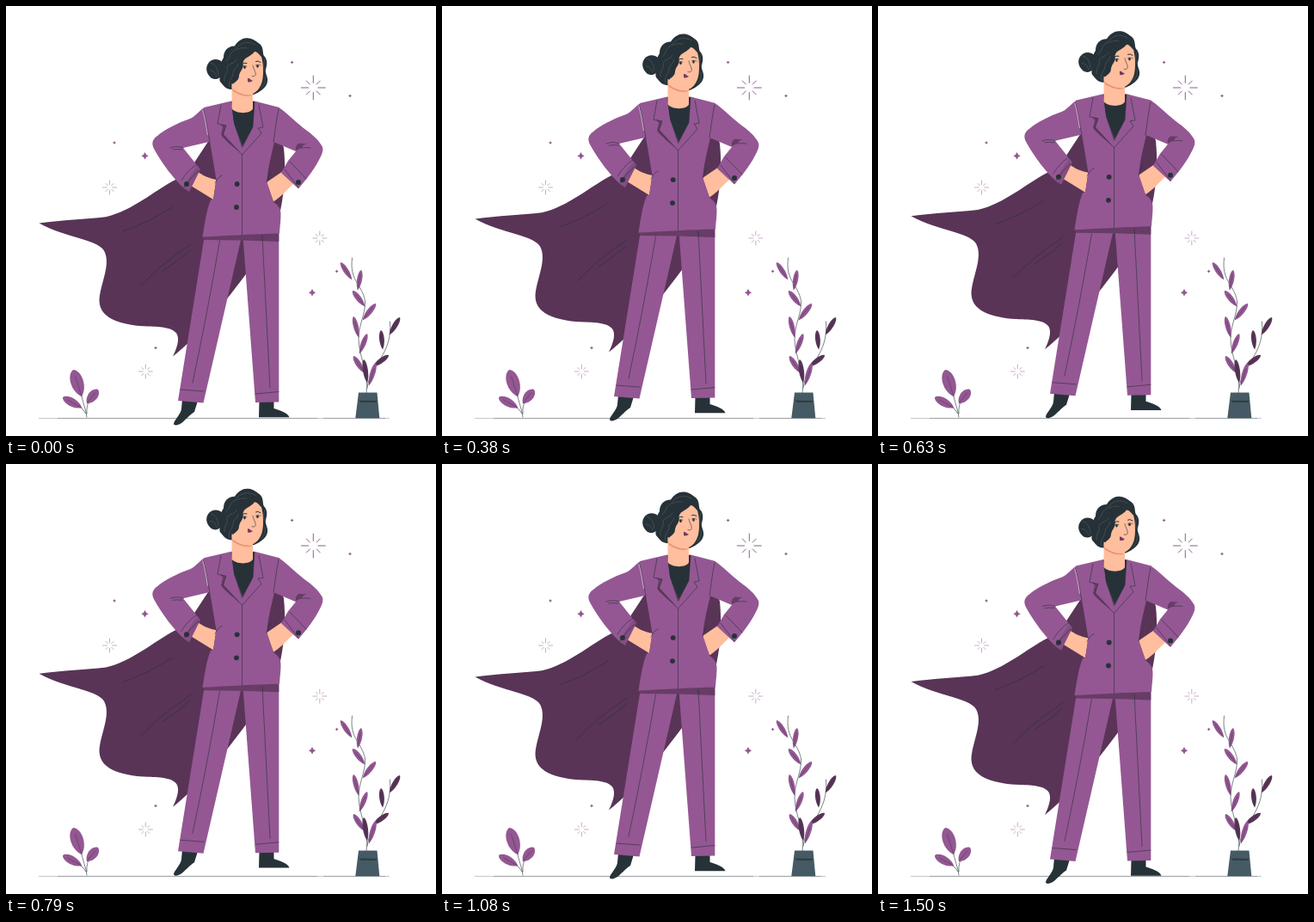
An HTML page that plays this animation: 500x500 px, repeating every 1540 ms.

```html
<!DOCTYPE html>
<html lang="en">
<head>
<meta charset="utf-8">
<title>Caped hero</title>
<style>
  html, body { margin: 0; width: 100%; height: 100%; overflow: hidden; background: #fff; }
  svg { display: block; width: 100vw; height: 100vh; }
  .p { fill: #945793; }
  .d { fill: #593457; }
  .s { fill: #673c66; }
  .k { fill: #263238; }
  .skin { fill: #ffbe9d; }
  .l { fill: none; stroke: #263238; stroke-width: .6; stroke-linecap: round; stroke-linejoin: round; }
  .h { fill: none; stroke: #5b666c; stroke-width: .5; stroke-linecap: round; }
</style>
</head>
<body>
<svg viewBox="0 0 500 500">
  <g id="scene">
    <path d="M60 479.4H362M369 479.4H441" fill="none" stroke="#4d575c" stroke-width=".6"/>
    <path d="M38 479.4H60M362 479.4H369M441 479.4H446" fill="none" stroke="#9aa1a4" stroke-width=".6"/>
  </g>

  <g id="hero">
    <!-- cape -->
    <path class="d" d="M38.5 252.5C66 249 92 248 116 245.300C147 238 172 215 197 202L219 182L240 150H318L323 165C325 185 325 210 319 238L281 309C255 344 222 386 194 407.500C198 399 202 389 199 382C195 374 181 373 165 372.500C140 371.500 109 366 108.500 343C109 325 121 304 115.500 288C112 271 68 270 38.500 252.500Z"/>
    <path class="l" d="M136 262Q168 251 193 234M157 325Q180 300 215 277M182 308Q200 297 214 284"/>

    <!-- shoes -->
    <path class="k" d="M205 457L223 459L219 472C213 476 208 482 204 485C200 487.500 196 488.500 195 486C195 482 204 474 204 468Z"/>
    <path class="k" d="M294.500 459H311.500V468C318 470 328 473 329.500 478.300H294Z"/>

    <!-- trousers -->
    <path class="p" d="M231 266L200 459L229.500 461.500L274 268Z"/>
    <path class="p" d="M275.500 268L290 461L317.300 460.500V264H276Z"/>
    <path class="s" d="M229 267L317.300 262V274L276 272.500L230 272Z"/>
    <path class="l" d="M248.500 273Q234 358 217 438M298 267L307 444M203 446L230 448M290 451L317 448.500"/>

    <!-- hands -->
    <path class="skin" d="M221 191.500C230 198 236 200 244.500 202L241 225L215 209Z"/>
    <path class="skin" d="M322 192L334 207C327 213 320 222 311 227.500L303 205Z"/>

    <!-- arms -->
    <path class="p" d="M231 118C226 120 221 128 214 131C200 136 185 143 176 151C170 155 169 160 172 166C182 184 195 201 207 212L213 216L226 190L206 165L238 157.500Z"/>
    <path class="p" d="M317 118C324 122 336 134 346 142C356 149 364 156 368 164C369 167 368 171 366 175C360 188 350 201 340 212.500L320 194L328 180L337 169L311 158Z"/>
    <path class="s" d="M337 168C336 162 340 158 344 160L350 160C345 161 345 164 343 165Z"/>
    <path class="s" d="M206 210L222 186L226 190L213 216Z" opacity=".35"/>
    <path class="l" d="M191 165Q199 162 206 165M194 167Q200 166 205 167M204 203Q211 191 222 184M349 201Q340 191 330 181M343 165Q349 164 354 165M207 211Q214 200 224 191M340 211L324 190"/>
    <circle class="k" cx="210" cy="207" r="3"/>
    <circle class="k" cx="340" cy="205" r="3"/>

    <!-- jacket -->
    <path class="p" d="M230 118L262 110.500H289L318 118L312 158C308 176 304 190 303.500 205L311 228C316 231 319 235 319.500 241C319.700 249 318.500 256 318 264.500C288 265 260 267 228.500 268.500C231 253 233 238 238 225.500L241 225L244.500 202C242 187 240 174 237 158Z"/>
    <path class="k" d="M262 111L265 136L275 163L287 141L289 111Z"/>
    <path class="s" d="M249 137L256 139L253 149L272 170C263 163 254 156 250 150L252 141Z"/>
    <path class="l" d="M262 112L266 138L274.500 164M250 115L246 137L256 139L252 150L274.500 173L297 148L293 142L299 141L294 115M289 112L287 140L275 164M274.500 173V266M229.500 121C233 133 234.500 146 237 158M317 120C314 133 313 146 311 158M243 206Q246 199 251 197M303 205Q305 197 308 193"/>
    <path d="M228.700 121C231.500 130 233 141 234.500 150" fill="none" stroke="#e6dbe6" stroke-width=".7"/>
    <circle class="k" cx="268.700" cy="207" r="2.900"/>
    <circle class="k" cx="268" cy="234" r="2.900"/>

    <!-- head -->
    <path class="k" d="M266 46.500C270 40 276 36.500 282 37.500C288 38 292 42 295 44C300 48 298 55 300 58C304 62 304 67 302 74C301 79 305 82 304 88C303 95 295 100 288 103L264 97C255 98 252 91 249 88C247 84 251 78 250 74C249 69 250 64 253 60C253 52 258 46.500 266 46.500Z"/>
    <path class="k" d="M251 65C246 60 238 62 235 67C231 73 234 80 239 84C245 87 249 83 252 81Z"/>
    <path class="skin" d="M262.500 90V119C266 125.500 284 126 287 119.500V99Z"/>
    <path d="M263 96C269 101 279 105 287 103C283 107 271 104 264 99Z" fill="#e89170"/>
    <path class="skin" d="M289 53C285 59 277 59 275.500 66C277 73 272 75 271 81C271 88 264 88 262.500 94C268 99 276 103 283 103C291 102 296 95 298 87C300 78 299 66 297 59C294 56 292 53 289 53Z"/>
    <path class="h" d="M268 49C274 41 283 41 290 45M256 64C262 59 259 55 266 51C273 49 276 48 280 49M254 87C253 80 259 77 257 72C258 66 266 68 268 62M260 94C257 87 265 83 264 77C266 72 269 72 270 67M238 66Q246 68 247 80M237 75Q242 74 245 82M301 62Q298 69 301 75M301 82Q303 89 297 95"/>
    <path class="l" d="M287 69C288 74 291 77 290 80.500C289 82 287.500 82 286 81.500"/>
    <path d="M274.500 67.500Q277 65.500 280 66.500M290.500 64.500Q293 63 296 65.500" fill="none" stroke="#263238" stroke-width="1" stroke-linecap="round"/>
    <ellipse class="k" cx="277.500" cy="71.300" rx="1.300" ry="1.800"/>
    <ellipse class="k" cx="292.500" cy="70" rx="1.300" ry="1.800"/>
    <path class="l" d="M274.500 70.500Q277 68.500 280 70M290.500 68.700Q293 67.500 296 69"/>
    <path d="M281 84C283 83.500 284 85.500 287 87C285 88.500 283 89 281 88Z" fill="#743b61"/>
  </g>
</svg>
<script>
const LOOP = 1540, PEAK = 730, LIFT = 10;
const PURPLE = '#945793', DARK = '#593457', INK = '#263238';
const scene = document.getElementById('scene');
const hero = document.getElementById('hero');

const path = (d, attrs) => `<path d="${d}" ${attrs}/>`;
const line = (d, color, w) => path(d, `fill="none" stroke="${color}" stroke-width="${w}" stroke-linecap="round"`);

// Pointed leaf from base (x, y) to tip (u, v); w is its half width.
function leaf(x, y, u, v, w, color) {
  const dx = u - x, dy = v - y, n = Math.hypot(dx, dy);
  const ox = -dy / n * w * 1.33, oy = dx / n * w * 1.33;
  const side = s => [x + dx * .25 + ox * s, y + dy * .25 + oy * s, x + dx * .88 + ox * s, y + dy * .88 + oy * s];
  const a = side(1), b = side(-1);
  const d = `M${x} ${y}C${a} ${u} ${v}C${b[2]} ${b[3]} ${b[0]} ${b[1]} ${x} ${y}Z`;
  return path(d, `fill="${color}"`) +
    line(`M${x} ${y}L${x + dx * .75} ${y + dy * .75}`, INK, .4);
}

function star(x, y, r) {
  const q = r * .22;
  return path(`M${x} ${y - r}Q${x + q} ${y - q} ${x + r} ${y}Q${x + q} ${y + q} ${x} ${y + r}` +
    `Q${x - q} ${y + q} ${x - r} ${y}Q${x - q} ${y - q} ${x} ${y - r}Z`, `fill="${PURPLE}"`);
}

function spark(x, y, r, color, w) {
  let d = '';
  for (let i = 0; i < 8; i++) {
    const a = i * Math.PI / 4, far = i % 2 ? r * .8 : r, near = r * .4;
    d += `M${x + near * Math.cos(a)} ${y + near * Math.sin(a)}L${x + far * Math.cos(a)} ${y + far * Math.sin(a)}`;
  }
  return line(d, color, w);
}

const stars = [[161.5, 174.3, 4.2], [356, 333.3, 4.2], [126, 159, 2], [332.6, 65.5, 2],
  [400, 104.6, 2], [384.6, 308.4, 2], [174, 397.5, 2]];
const sparks = [[120.5, 211], [364.8, 270], [162.3, 425]];

const tall = [[402, 318, 389, 298, 3], [409, 330, 413, 307, 3], [417, 349, 403, 331, 3.2],
  [415, 365, 430, 346, 3.2], [410, 385, 404, 361, 3], [411, 404, 420, 381, 3],
  [416, 426, 404, 407, 3.2]];
const side = [[420, 438, 416, 411, 3], [438, 399, 436, 377, 2.9],
  [446, 382, 458, 362, 3], [427, 419, 445, 406, 3]];

scene.innerHTML +=
  stars.map(s => star(...s)).join('') +
  sparks.map(([x, y]) => spark(x, y, 8, '#b08ab0', .7)).join('') +
  spark(357.3, 95, 14, '#7a527b', .9) +
  // small sprout
  line('M94 478C93 469 89 461 87 449M94 474Q93 464 98 457M93 474Q89 467 82 464', INK, .6) +
  leaf(88, 454, 78, 423, 7.4, PURPLE) +
  leaf(94, 462, 107, 446, 5.5, PURPLE) +
  leaf(88, 467, 66, 455, 4.8, PURPLE) +
  // potted plant
  line('M419 450C423 430 411 410 410 388C410 369 418 360 417.500 343C414 323 399 320 402.500 293', INK, .6) +
  line('M420 444C423 418 450 405 446.500 367', INK, .6) +
  tall.map(l => leaf(...l, PURPLE)).join('') +
  side.map(l => leaf(...l, DARK)).join('') +
  leaf(422, 441, 430, 415, 3, PURPLE) +
  path('M410 449.500H431.500L434.300 479.300H406.300Z', 'fill="#455a64"') +
  path('M410 458.500L432 459L430 461H413Z', `fill="${INK}" opacity=".7"`);

// Steady rise to the peak, then steady fall.
function lift(t) {
  const gap = Math.abs((t - PEAK + LOOP * 1.5) % LOOP - LOOP / 2);
  return LIFT * (1 - gap / (LOOP / 2));
}

const rest = lift(0);
let start = null;
function draw(now) {
  if (start === null) start = now;
  const y = rest - lift((now - start) % LOOP);
  hero.setAttribute('transform', `translate(0 ${y.toFixed(3)})`);
  requestAnimationFrame(draw);
}
requestAnimationFrame(draw);
</script>
</body>
</html>
```
